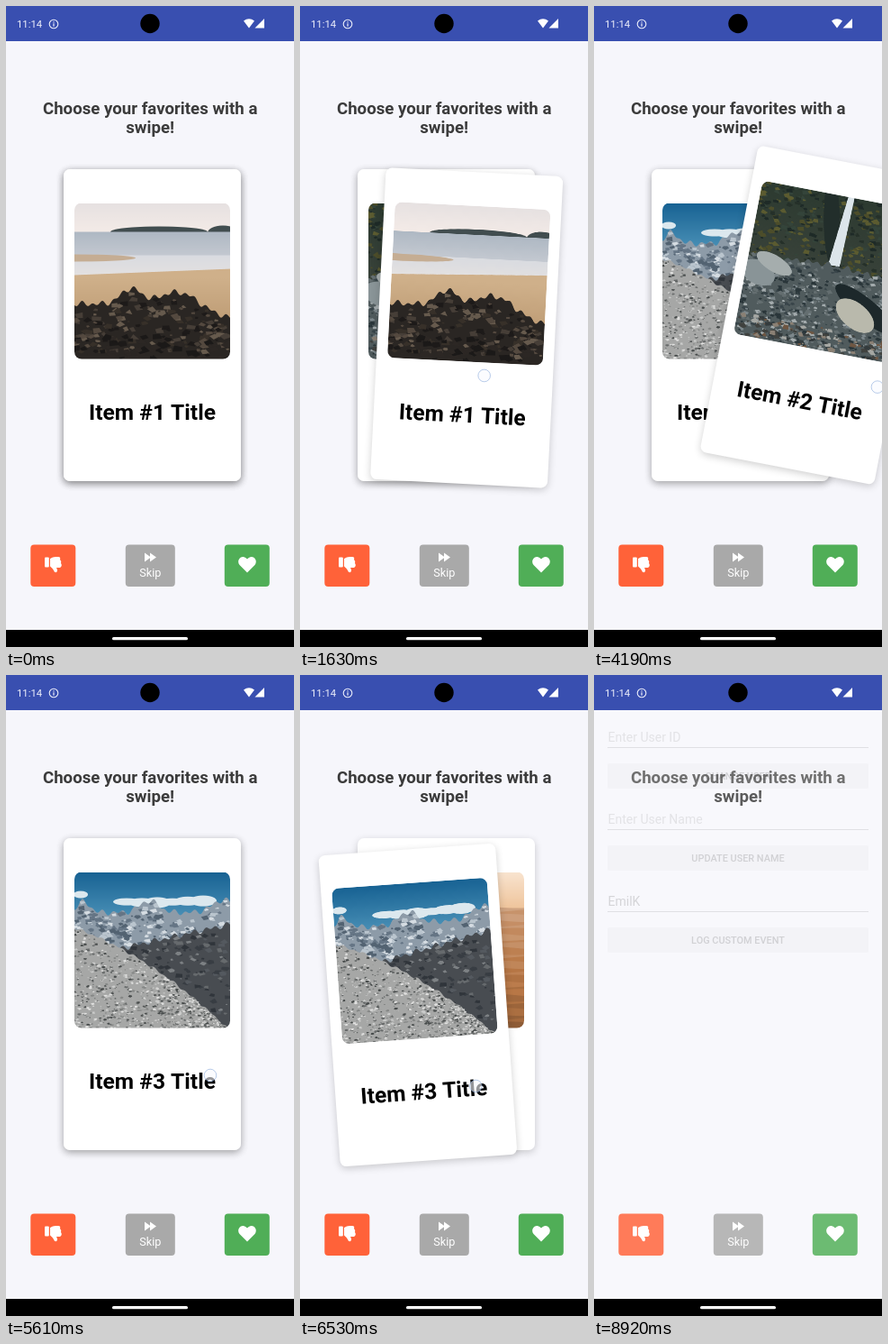
These frames come from a looping animation (320 by 711 pixels, 9010 ms). An HTML page with a canvas:

```html
<!DOCTYPE html>
<html lang="en">
<head>
<meta charset="utf-8">
<title>Swipe cards</title>
<style>
  html, body { margin: 0; width: 100%; height: 100%; overflow: hidden; background: #f6f6fb; }
  canvas { display: block; width: 320px; height: 711px; }
</style>
</head>
<body>
<canvas id="stage"></canvas>
<script>
const LOOP = 9010, W = 320, H = 711, PIC = 173;
const canvas = document.getElementById('stage');
const ratio = window.devicePixelRatio || 1;
canvas.width = W * ratio;
canvas.height = H * ratio;
const ctx = canvas.getContext('2d');
const FONT = 'Roboto, sans-serif';
const clamp = v => Math.min(1, Math.max(0, v));

// Drag keys: time, x, y offset. The finger follows the card, times "reach".
const swipes = [
  { keys: [[400, 0, 0], [660, 27, -3], [1085, -63, 10], [1280, -33, 8], [1950, 100, -5], [2200, 370, -40]],
    touch: { x: 182, y: 407, from: 300, to: 1950 } },
  { keys: [[3270, 0, 0], [3930, 28, 0], [4110, 28, 0], [4190, 83.5, -11], [4510, 390, -50]],
    touch: { x: 148, y: 452, from: 3090, to: 4235, reach: [1.98, 2.64] } },
  { keys: [[5610, 0, 0], [5940, 22, 3], [6530, -31.5, 12], [7100, -105, 14], [7360, -370, 30]],
    touch: { x: 227, y: 444, from: 5300, to: 7100 } },
  { keys: [[8430, 0, 0], [8800, -370, 20]] }
];

// Monotone cubic interpolation through the keys.
function along(keys, t, c) {
  const last = keys.length - 1;
  if (t <= keys[0][0]) return keys[0][c];
  if (t >= keys[last][0]) return keys[last][c];
  let i = 0;
  while (t > keys[i + 1][0]) i++;
  const slope = k => (keys[k + 1][c] - keys[k][c]) / (keys[k + 1][0] - keys[k][0]);
  const tangent = k => {
    if (k === 0) return 0;
    if (k === last) return slope(k - 1);
    const a = slope(k - 1), b = slope(k);
    return a * b <= 0 ? 0 : 2 * a * b / (a + b);
  };
  const d = keys[i + 1][0] - keys[i][0], u = (t - keys[i][0]) / d, v = 1 - u;
  return v * v * (1 + 2 * u) * keys[i][c] + u * u * (3 - 2 * u) * keys[i + 1][c]
    + d * u * v * (v * tangent(i) - u * tangent(i + 1));
}

function painter(g, seed) {
  const rnd = () => (seed = (seed * 16807) % 2147483647) / 2147483647;
  const fade = (y0, y1, a, b) => {
    const f = g.createLinearGradient(0, y0, 0, y1);
    f.addColorStop(0, a);
    f.addColorStop(1, b);
    g.fillStyle = f;
    g.fillRect(0, y0, PIC, y1 - y0);
  };
  // Everything below the curve y = top(x).
  const land = (color, top) => {
    g.fillStyle = color;
    g.beginPath();
    g.moveTo(0, PIC);
    for (let x = 0; x <= PIC; x++) g.lineTo(x, top(x));
    g.lineTo(PIC, PIC);
    g.fill();
  };
  const blob = (color, x, y, rx, ry, turn = 0) => {
    g.fillStyle = color;
    g.beginPath();
    g.ellipse(x, y, rx, ry, turn, 0, 7);
    g.fill();
  };
  // Angular flecks scattered between a curve and a depth.
  const flecks = (n, size, top, bottom, ...colors) => {
    for (let i = 0; i < n; i++) {
      const x = rnd() * PIC, y0 = top(x), y = y0 + rnd() * (bottom - y0);
      const s = size * (0.3 + rnd());
      g.fillStyle = colors[Math.floor(rnd() * colors.length)];
      g.beginPath();
      for (let a = rnd(); a < 6; a += 1 + rnd()) g.lineTo(x + s * Math.cos(a), y + s * 0.6 * Math.sin(a));
      g.fill();
    }
  };
  return { g, fade, land, blob, flecks };
}

const bump = (x, at, width) => Math.exp(-(((x - at) / width) ** 2));
const jag = x => 2 * Math.sin(x * 0.55) + 1.5 * Math.sin(x * 0.31 + 2);

function beach({ fade, land, blob, flecks }) {
  fade(0, 33, '#e6e1e1', '#f4ebe7');
  blob('#414d4f', 94, 32, 54, 6);
  blob('#414d4f', 165, 33, 17, 8);
  fade(32, 58, '#aeb8c3', '#c3c8d0');
  fade(58, 82, '#d9dbe0', '#e4e1e0');
  blob('#c5ad93', 0, 61, 68, 4);
  land('#cfb08a', x => 80 - x * 0.04);
  fade(84, PIC, '#cfb08a', '#b08c64');
  const rocks = x => 112 + jag(x) - 17 * bump(x, 63, 16) - 13 * bump(x, 113, 26) + 15 * clamp((x - 130) / 40);
  land('#2a2623', rocks);
  flecks(170, 5, x => rocks(x) + 4, 165, '#463e37', '#373029', '#54493f', '#1d1a19', '#665a4d');
  flecks(60, 6, () => 148, PIC, '#1b1918', '#2c2724');
}

function falls({ g, fade, land, blob, flecks }) {
  fade(0, 90, '#2c3a30', '#39423a');
  flecks(380, 4, () => 0, 82, '#253029', '#4c4d2a', '#5b5b30', '#34443a', '#1e2a27');
  blob('#222e2b', 84, 30, 9, 50, -0.2);
  g.fillStyle = '#dce5ea';
  g.beginPath();
  [97, 0, 104, 0, 102, 78, 89, 78].forEach((x, i, p) => i % 2 || g.lineTo(x, p[i + 1]));
  g.fill();
  land('#505b5d', x => 84 - 6 * bump(x, 90, 60) + jag(x));
  flecks(700, 3.2, () => 82, PIC, '#7c878b', '#39454a', '#a3abad', '#2a363a', '#646e70');
  blob('#899497', 14, 101, 20, 13, 0.3);
  blob('#a5adad', 30, 88, 22, 9, 0.35);
  blob('#1d282b', 139, 119, 42, 12, 0.5);
  blob('#b9b9ac', 129, 128, 25, 14, 0.5);
  flecks(130, 4, () => 148, PIC, '#6e5642', '#40423f', '#8a8074', '#343b3d', '#a5a7a3');
}

function peaks({ fade, land, blob, flecks }) {
  fade(0, 60, '#176293', '#5499bd');
  blob('#dce8ee', 7, 25, 8, 4);
  for (let i = 0; i < 6; i++) blob('#dce8ee', 58 + i * 17, 33 + Math.sin(i), 15, 4 + i % 3);
  const ridge = x => 45 + jag(x) - 12 * bump(x, 10, 10) - 13 * bump(x, 83, 15) - 14 * bump(x, 166, 18);
  land('#8d9ba8', ridge);
  flecks(260, 4, x => ridge(x) + 3, 82, '#bac5ce', '#657585', '#d5dce2', '#536372');
  const valley = x => 96 - x * 0.22 + jag(x);
  land('#484c51', valley);
  flecks(260, 4, x => valley(x) + 3, 160, '#383d43', '#666a6d', '#54595f', '#30353b', '#7d8184');
  const slope = x => 62 + x * 0.35 + x * x * 0.0018 + jag(x) / 2;
  land('#a6a7a6', slope);
  flecks(1100, 1.9, x => slope(x) + 1, 175, '#cacbca', '#686b6b', '#e0e0df', '#858786', '#474b4b');
}

function dunes({ fade, land }) {
  fade(0, 40, '#f9e4d0', '#efc59c');
  for (let i = 0; i < 26; i++) {
    const light = 66 - i * 0.9 - (i % 2) * 5;
    land(`hsl(26 45% ${light}%)`, x => 38 + i * 5.2 + 2 * Math.sin(x / 21 + i * 1.9));
  }
}

const pictures = [beach, falls, peaks, dunes].map((paint, i) => {
  const c = document.createElement('canvas');
  c.width = c.height = PIC * 2;
  const g = c.getContext('2d');
  g.scale(2, 2);
  paint(painter(g, 311 + i * 97));
  return c;
});

function box(x, y, w, h, r, color) {
  ctx.fillStyle = color;
  ctx.beginPath();
  ctx.roundRect(x, y, w, h, r);
  ctx.fill();
}

function label(text, x, y, size, color, weight = 400, align = 'center') {
  ctx.font = `${weight} ${size}px ${FONT}`;
  ctx.textAlign = align;
  ctx.fillStyle = color;
  ctx.fillText(text, x, y);
}

function disc(x, y, r, color) {
  ctx.fillStyle = color;
  ctx.beginPath();
  ctx.arc(x, y, r, 0, 7);
  ctx.fill();
}

function icon(d, x, y) {
  ctx.save();
  ctx.translate(x, y);
  ctx.fillStyle = '#fff';
  ctx.fill(new Path2D(d));
  ctx.restore();
}

function drawCard(i, t) {
  const { keys } = swipes[i];
  const dx = along(keys, t, 1), dy = along(keys, t, 2);
  ctx.save();
  ctx.translate(162.5 + dx, 354 + dy);
  ctx.rotate(dx * 0.129 * Math.PI / 180);
  ctx.save();
  ctx.shadowColor = 'rgba(0,0,0,.19)';
  ctx.shadowBlur = 9 * ratio;
  ctx.shadowOffsetY = 2.5 * ratio;
  box(-98.5, -173, 197, 346, 7, '#fff');
  ctx.restore();
  label(`Item #${i + 1} Title`, 0, 105, 24.6, '#000', 700);
  ctx.beginPath();
  ctx.roundRect(-PIC / 2, -135.5, PIC, PIC, 8);
  ctx.clip();
  ctx.drawImage(pictures[i], -PIC / 2, -135.5, PIC, PIC);
  ctx.restore();
}

function drawButtons() {
  box(27.3, 597.6, 50, 46.4, 4, '#ff6239');
  box(132.8, 597.6, 55, 46.4, 4, '#a9a9a9');
  box(242.8, 597.6, 50, 46.4, 4, '#50ae57');
  box(43, 611.5, 4.8, 11, 1, '#fff');
  icon('M0 2Q3 0 6 0H9Q12 0 11 3Q13 5 12 7Q14 10 11 12H7Q9 16 7 17Q5 18 4 15Q3 13 0 10.5Z', 49, 611);
  icon('M0 0L6 4.2V0L13 5L6 10V5.8L0 10Z', 154, 606.5);
  icon('M10 17.5L1.5 9C-3 3 5-4 10 2.6C15-4 23 3 18.5 9Z', 258, 611);
  label('Skip', 160.3, 633.3, 12.7, '#fff');
}

function drawBars() {
  const ink = '#eef0fb';
  ctx.fillStyle = '#394fb0';
  ctx.fillRect(0, 0, W, 39);
  label('11:14', 12, 24, 11.3, ink, 400, 'left');
  ctx.strokeStyle = ink;
  ctx.lineWidth = 1.1;
  ctx.beginPath();
  ctx.arc(53, 20, 4.8, 0, 7);
  ctx.stroke();
  ctx.fillStyle = ink;
  ctx.fillRect(52.4, 19.3, 1.2, 3.4);
  ctx.fillRect(52.4, 17.2, 1.2, 1.2);
  disc(160, 19.5, 10.7, '#000');
  icon('M0 2.6Q6 -2 12 2.6L6 10.5Z', 264, 14);
  icon('M10.5 0V10.5H0Z', 276.5, 14);
  ctx.fillStyle = '#000';
  ctx.fillRect(0, 692, W, 19);
  box(118, 700, 84, 3.3, 1.6, '#fff');
}

function drawForm() {
  ctx.fillStyle = '#fafafa';
  ctx.fillRect(0, 39, W, 653);
  const rows = [['Enter User ID', 'CHANGE USER'], ['Enter User Name', 'UPDATE USER NAME'], ['EmilK', 'LOG CUSTOM EVENT']];
  rows.forEach(([field, action], i) => {
    const y = i * 91;
    label(field, 15.5, y + 74, 14, i === 2 ? '#222' : '#777', 400, 'left');
    ctx.fillStyle = '#555';
    ctx.fillRect(15, y + 80, 290, 0.9);
    box(15, y + 98, 290, 28, 2, '#d6d7d7');
    label(action, 160, y + 116, 10.9, '#222', 500);
  });
}

function drawTouch(t) {
  swipes.forEach(({ keys, touch }) => {
    if (!touch || t < touch.from || t >= touch.to) return;
    const [rx, ry] = touch.reach || [1, 1];
    disc(touch.x + along(keys, t, 1) * rx, touch.y + along(keys, t, 2) * ry, 6.8, 'rgba(248,250,255,.6)');
    ctx.strokeStyle = 'rgba(125,160,215,.6)';
    ctx.lineWidth = 0.9;
    ctx.stroke();
  });
}

function draw(t) {
  ctx.setTransform(ratio, 0, 0, ratio, 0, 0);
  ctx.fillStyle = '#f6f6fb';
  ctx.fillRect(0, 0, W, H);
  label('Choose your favorites with a', 160.2, 119.7, 18.65, '#3b3b3b', 700);
  label('swipe!', 160.2, 141.3, 18.65, '#3b3b3b', 700);
  drawButtons();

  let top = 0;
  while (top < 4 && t >= swipes[top].keys.at(-1)[0]) top++;
  for (let i = Math.min(3, top + 2); i >= top; i--) drawCard(i, t);

  const reveal = clamp((t - 8840) / 80) * 0.16;
  if (reveal > 0) {
    ctx.globalAlpha = reveal;
    drawForm();
    ctx.globalAlpha = 1;
  }
  drawTouch(t);
  drawBars();
}

const start = performance.now();
function tick() {
  draw((performance.now() - start) % LOOP);
  requestAnimationFrame(tick);
}
tick();
</script>
</body>
</html>
```
